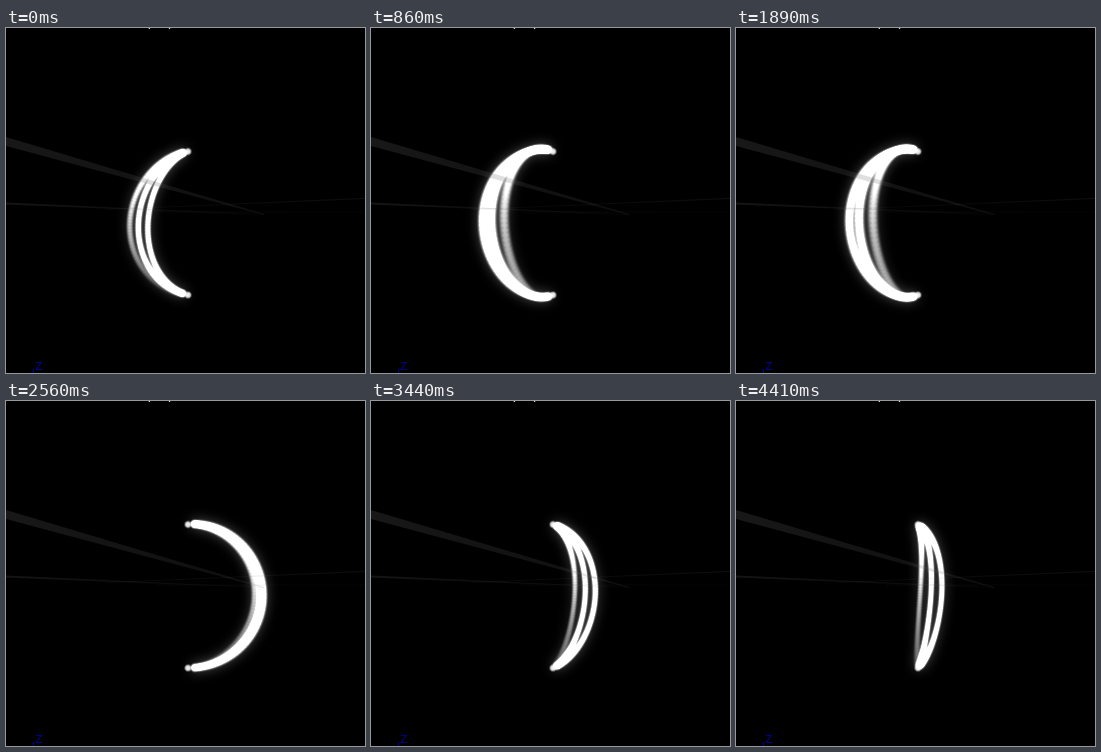
Recreate the animation shown at these times as an HTML page with a canvas. Size 359x345 px, loop 4520 ms.

```html
<!DOCTYPE html>
<html>
<head>
<meta charset="utf-8">
<style>
html, body { margin: 0; width: 100%; height: 100%; overflow: hidden; background: #000; }
canvas { display: block; }
</style>
</head>
<body>
<canvas id="stage" width="359" height="345"></canvas>
<script>
const stage = document.getElementById('stage');
const ctx = stage.getContext('2d');

function makeCanvas(w, h) {
  const c = document.createElement('canvas');
  c.width = w;
  c.height = h;
  return c;
}

const layer = makeCanvas(stage.width, stage.height);
const rope = layer.getContext('2d');
rope.globalCompositeOperation = 'lighter';

const LOOP = 4520, HOLD = 500, STEP = 51.4, LAST = 76;
const CX = 182, CY = 195, R = 72;
const DEPTH = 0.31;   // radius divided by camera distance
const LAG = 11.4;     // degrees between two passes of the trail
const DOTS = 60;

// Soft white particle
const spark = makeCanvas(32, 32);
{
  const c = spark.getContext('2d');
  const g = c.createRadialGradient(16, 16, 0, 16, 16, 16);
  for (const [at, a] of [[0, 1], [0.45, 0.8], [0.8, 0.15], [1, 0]]) {
    g.addColorStop(at, `rgba(255,255,255,${a})`);
  }
  c.fillStyle = g;
  c.fillRect(0, 0, 32, 32);
}

function drawSpark(c, x, y, r, light) {
  c.globalAlpha = light;
  c.drawImage(spark, x - r, y - r, 2 * r, 2 * r);
  c.globalAlpha = 1;
}

// A half circle turning about its vertical diameter, seen in perspective.
function drawRope(angle) {
  rope.clearRect(0, 0, layer.width, layer.height);
  for (let pass = 0; pass < 3; pass++) {
    for (let i = 0; i <= DOTS; i++) {
      const f = 0.03 + 0.94 * i / DOTS;
      const age = pass + f;
      const phi = (f - 0.5) * Math.PI;
      const turn = (angle - (age - 0.5) * LAG) * Math.PI / 180;
      const out = Math.cos(phi);
      const scale = 1 / (1 - DEPTH * out * Math.sin(turn));
      const light = Math.min(1, (3.1 - age) / 1.1) ** 1.3;
      drawSpark(rope, CX + R * out * Math.cos(turn) * scale,
        CY + R * Math.sin(phi) * scale, 5.2 * scale, light);
    }
  }
}

function beam(points, near, far) {
  const g = ctx.createLinearGradient(points[0][0], 0, points[2][0], 0);
  g.addColorStop(0, `rgba(95,95,95,${near})`);
  g.addColorStop(1, `rgba(95,95,95,${far})`);
  ctx.fillStyle = g;
  ctx.beginPath();
  points.forEach(p => ctx.lineTo(...p));
  ctx.fill();
}

function drawScene(angle) {
  ctx.fillStyle = '#000';
  ctx.fillRect(0, 0, stage.width, stage.height);

  drawRope(angle);
  ctx.save();
  ctx.globalAlpha = 0.3;
  ctx.filter = 'blur(6px)';
  ctx.drawImage(layer, 0, 0);
  ctx.restore();
  ctx.drawImage(layer, 0, 0);

  for (const y of [123.5, 267]) {
    drawSpark(ctx, CX, y, 4.4, 0.9);
    drawSpark(ctx, CX, y, 4.4, 0.6);
  }

  beam([[0, 109], [0, 118], [258, 187], [258, 186]], 0.25, 0.15);
  beam([[0, 174.5], [0, 176.5], [258, 187], [258, 186.2]], 0.22, 0.06);
  beam([[359, 169.8], [359, 171], [100, 182], [100, 181.2]], 0.14, 0.08);
  beam([[359, 183.6], [359, 184.4], [150, 184.4], [150, 183.6]], 0.04, 0.07);

  ctx.fillStyle = '#fff';
  ctx.font = '13px "Liberation Sans", sans-serif';
  ctx.fillText('(0,0)', 140, -2);
  ctx.fillStyle = '#0000a0';
  ctx.font = '11px "Liberation Sans", sans-serif';
  ctx.fillText('Z', 29.5, 342);
  ctx.fillRect(27, 341, 1, 4);
}

function angleAt(t) {
  if (t < HOLD) return 227;
  const n = Math.min(LAST, Math.floor((t - HOLD) / STEP));
  return 142.5 + 0.3475 * (HOLD + n * STEP - 860);
}

const start = performance.now();
function tick() {
  drawScene(angleAt((performance.now() - start) % LOOP));
  requestAnimationFrame(tick);
}
tick();
</script>
</body>
</html>
```
